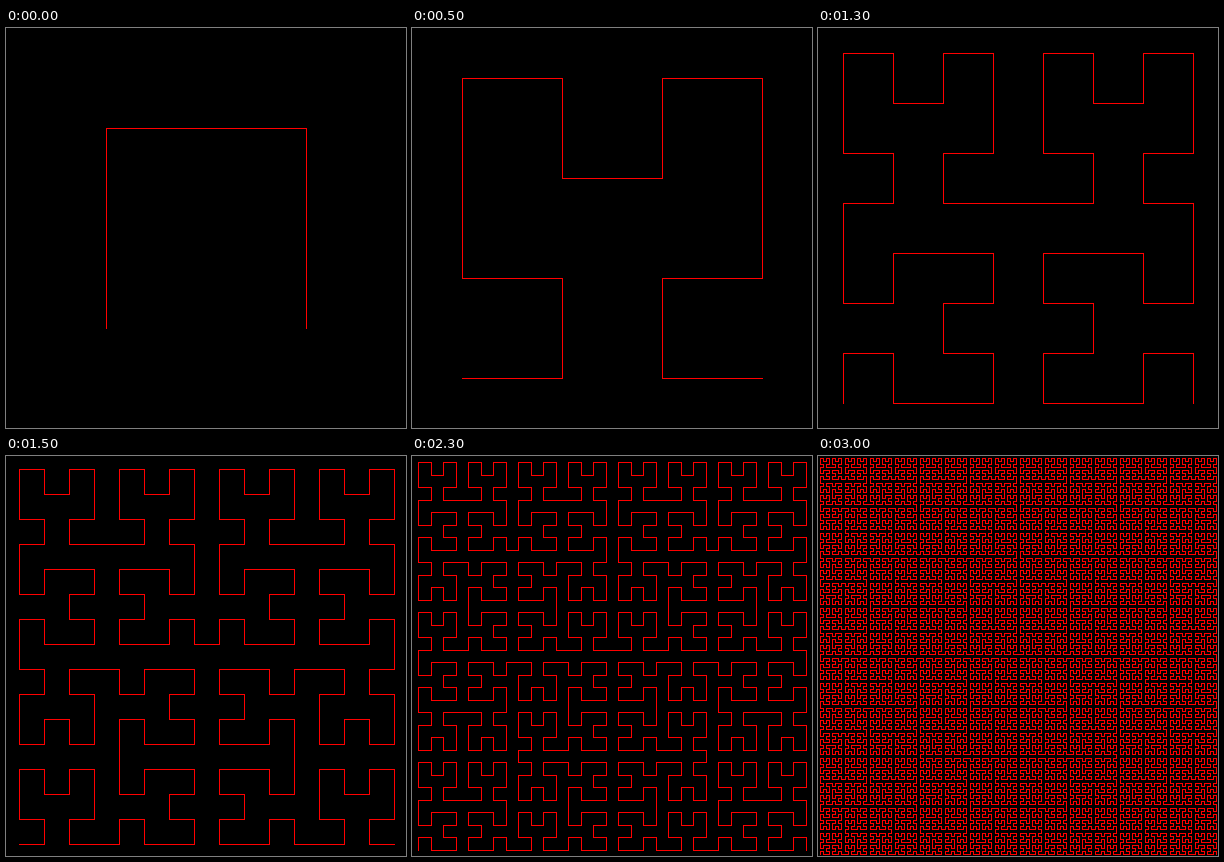
These frames come from a looping animation (400x400 px, 3.5 s). An HTML page with a canvas:

```html
<!DOCTYPE html>
<html lang="en">
<head>
<meta charset="utf-8">
<title>Hilbert curve</title>
<style>
  html, body { margin: 0; width: 100%; height: 100%; overflow: hidden; background: #000; }
  canvas { display: block; }
</style>
</head>
<body>
<canvas id="stage" width="400" height="400"></canvas>
<script>
const SIZE = 400, ORDERS = 7, STEP_MS = 500;
const ctx = document.getElementById('stage').getContext('2d');

// Visits the curve inside the cell at (x, y) spanned by vectors a and b.
function hilbert(order, x, y, ax, ay, bx, by, points) {
  if (order === 0) {
    points.push([x + (ax + bx) / 2, y + (ay + by) / 2].map(Math.round));
    return points;
  }
  ax /= 2; ay /= 2; bx /= 2; by /= 2;
  const n = order - 1;
  hilbert(n, x, y, bx, by, ax, ay, points);
  hilbert(n, x + ax, y + ay, ax, ay, bx, by, points);
  hilbert(n, x + ax + bx, y + ay + by, ax, ay, bx, by, points);
  hilbert(n, x + ax + 2 * bx, y + ay + 2 * by, -bx, -by, -ax, -ay, points);
  return points;
}

function draw(order) {
  const points = hilbert(order, 0, SIZE, 0, -SIZE, SIZE, 0, []);
  ctx.fillStyle = '#000';
  ctx.fillRect(0, 0, SIZE, SIZE);
  ctx.fillStyle = '#f00';
  for (let i = 1; i < points.length; i++) {
    const [x1, y1] = points[i - 1], [x2, y2] = points[i];
    ctx.fillRect(Math.min(x1, x2), Math.min(y1, y2),
      Math.abs(x2 - x1) + 1, Math.abs(y2 - y1) + 1);
  }
}

let shown = 0;
function tick() {
  const order = 1 + Math.floor(performance.now() / STEP_MS) % ORDERS;
  if (order !== shown) draw(shown = order);
  requestAnimationFrame(tick);
}
tick();
</script>
</body>
</html>
```
